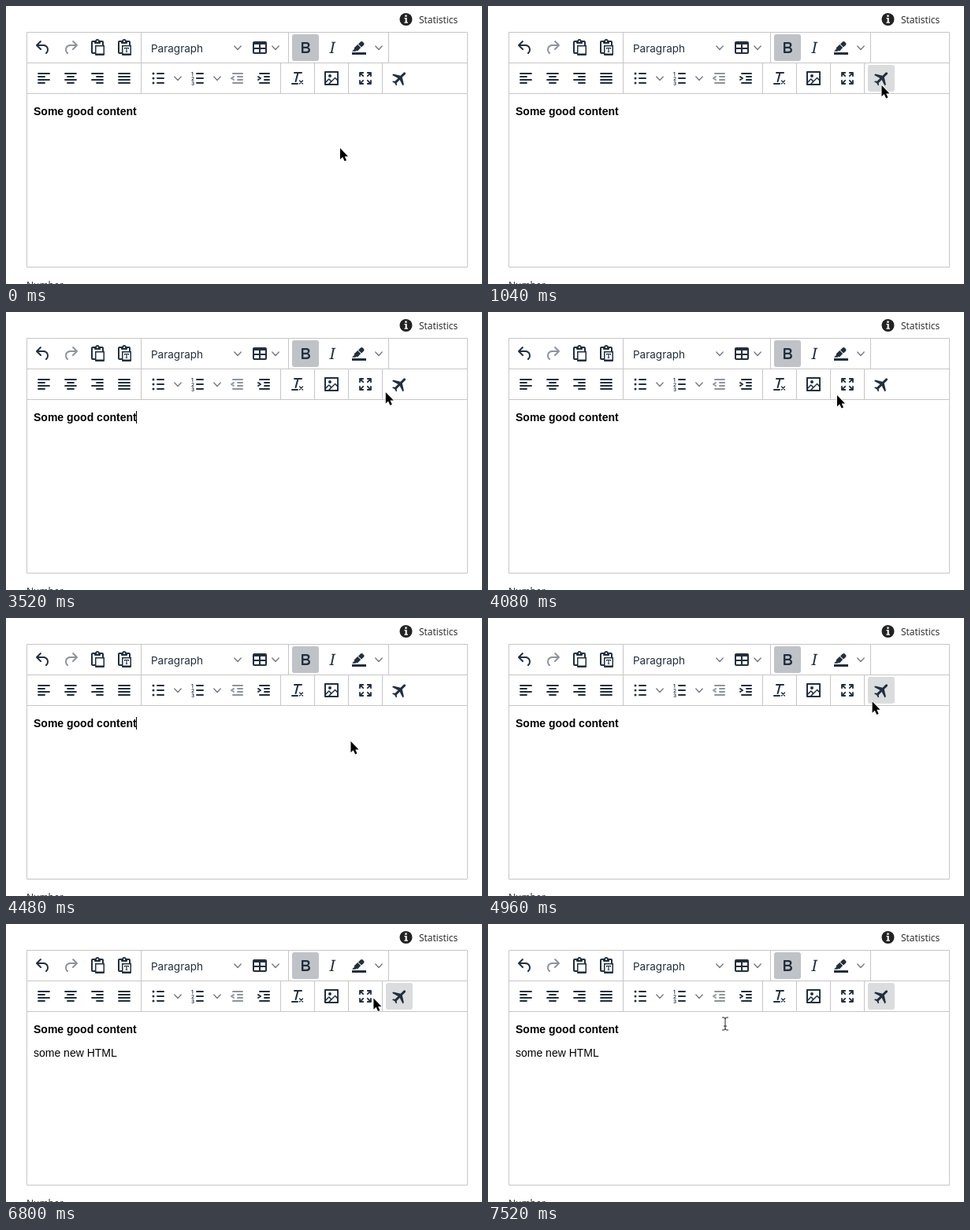
These frames come from a looping animation (604 px wide and 354 px high, 8.16 s). An HTML page:

```html
<!DOCTYPE html>
<html lang="en">
<head>
<meta charset="utf-8">
<title>Editor toolbar</title>
<style>
html, body { margin: 0; width: 100%; height: 100%; overflow: hidden; background: #fff; }
svg { display: block; }
.ui { font-family: Inter, sans-serif; }
.page { font: 12px "Open Sans", sans-serif; fill: #222; }
.body { font: 14px "Liberation Sans", Arial, sans-serif; fill: #000; }
.b { font-weight: bold; }
</style>
</head>
<body>
<svg width="604" height="354" viewBox="0 0 604 354">
  <circle cx="507.5" cy="17" r="8" fill="#222"/>
  <path d="M505.5 15h3.2v5.5h1.3v1.3h-4.6v-1.3h1.3v-4.2h-1.2zM506.3 11.4h2.4v2.3h-2.4z" fill="#fff"/>
  <text class="page" x="524" y="22">Statistics</text>
  <text class="page" x="26" y="360">Number</text>
  <path d="M26.5 33.5h559v299h-559zM26.5 72.5h559M26.5 111.5h559M171.5 33.5v78M358.5 33.5v39M485.5 33.5v39M348.5 72.5v39M391.5 72.5v39M434.5 72.5v39M477.5 72.5v39" fill="none" stroke="#c6c6c6"/>
  <rect x="363" y="36" width="34" height="34" rx="3" fill="#bfc3c8"/>
  <rect id="hover" x="482" y="75" width="34" height="34" rx="3"/>
  <g id="icons"></g>
  <text class="ui" x="184" y="58.5" font-size="13.5" fill="#222f3e">Paragraph</text>
  <g class="ui" font-size="6.5" font-weight="600" fill="#222f3e"><text x="235" y="89">1</text><text x="235" y="95">2</text><text x="235" y="101">3</text></g>
  <text class="body b" x="35" y="139">Some good content</text>
  <text class="body" id="added" x="35" y="169">some new HTML</text>
  <path id="caret" d="M165.5 126v16" stroke="#000"/>
  <g id="tip">
    <rect x="499" y="118" width="105" height="19" fill="#414042"/>
    <text class="ui" x="505" y="131.3" font-size="11" fill="#fff">Exclamation mark</text>
  </g>
  <path id="arrow" d="M0 0V14.2L3.2 11.2 5.6 16.6 8 15.6 5.7 10.4H10Z" fill="#000" stroke="#fff" stroke-width="1.2" paint-order="stroke"/>
  <path id="beam" d="M-4-8h2q2 0 2 2V6q0 2 2 2h2M4-8H2q-2 0-2 2M-4 8h2q2 0 2-2M-2 3h4" fill="none" stroke="#222"/>
</svg>
<script>
const $ = id => document.getElementById(id);
const INK = '#222f3e', DIM = '#8d949c';
const LOOP = 8160, STEP = 80;

// Icons use a 24px box centred on cx, cy
let markup = '';
function add(cx, cy, d, attrs) {
  markup += `<path transform="translate(${cx - 12} ${cy - 12})" d="${d}" ${attrs}/>`;
}
const fill = (cx, cy, d, color = INK) => add(cx, cy, d, `fill="${color}" fill-rule="evenodd"`);
const line = (cx, cy, d, color = INK, w = 2) =>
  add(cx, cy, d, `fill="none" stroke="${color}" stroke-width="${w}" stroke-linecap="round" stroke-linejoin="round"`);

const clip = 'M18 9V5h-2v1c0 .6-.4 1-1 1H9a1 1 0 0 1-1-1V5H6v13h3V9h9zM9 20H6a2 2 0 0 1-2-2V5c0-1.1.9-2 2-2h3.2A3 3 0 0 1 12 1a3 3 0 0 1 2.8 2H18a2 2 0 0 1 2 2v4h1v12.1c0 .5-.4.9-.9.9H9.9c-.5 0-.9-.4-.9-.9V20zm1.5-9.5v9h9v-9h-9zM12 3a1 1 0 0 0-1 1c0 .5.4 1 1 1s1-.5 1-1-.4-1-1-1z';
const undo = 'M6.4 8H12c3.7 0 6.2 2 6.8 5.1.6 2.7-.4 5.6-2.3 6.8a1 1 0 0 1-1-1.8c1.1-.6 1.8-2.7 1.4-4.6-.5-2.1-2.1-3.5-4.9-3.5H6.4l3.3 3.3a1 1 0 1 1-1.4 1.4l-5-5a1 1 0 0 1 0-1.4l5-5a1 1 0 0 1 1.4 1.4L6.4 8z';

fill(47, 53, undo);
markup += `<g transform="translate(165 0) scale(-1 1)">`;
fill(83, 53, undo, DIM);
markup += '</g>';
fill(116, 53, clip);
fill(150, 53, clip + 'M12 12h6v2h-.6q0-1-1-1h-.8v4.5h.8v.6h-2.8v-.6h.8V13h-.8q-1 0-1 1H12z');
fill(322, 53, 'M19 4a2 2 0 0 1 2 2v12a2 2 0 0 1-2 2H5a2 2 0 0 1-2-2V6c0-1.1.9-2 2-2h14zM5 14v4h6v-4H5zm14 0h-6v4h6v-4zm0-6h-6v4h6V8zM5 12h6V8H5v4z');
fill(380, 53, 'M7.8 19c-.3 0-.5 0-.6-.2l-.2-.5V5.7c0-.2 0-.4.2-.5l.6-.2h5c1.5 0 2.7.3 3.5 1 .7.6 1.1 1.4 1.1 2.5a3 3 0 0 1-.6 1.9c-.4.6-1 1-1.6 1.2.4.1.9.3 1.3.6s.8.7 1 1.2c.4.4.5 1 .5 1.6 0 1.3-.4 2.3-1.3 3-.8.7-2.1 1-3.8 1H7.8zm5-8.3c.6 0 1.2-.1 1.6-.5.4-.3.6-.7.6-1.3 0-1.1-.8-1.7-2.3-1.7H9.3v3.5h3.4zm.5 6c.7 0 1.3-.1 1.7-.4.4-.4.6-.9.6-1.5s-.2-1-.7-1.4c-.4-.3-1-.4-2-.4H9.4v3.8h4z');
fill(414, 53, 'M16.7 4.7l-.1.9h-.3c-.6 0-1 0-1.4.3-.3.3-.4.6-.5 1.1l-2.1 9.8v.6c0 .5.4.8 1.4.8h.2l-.2.8H8l.2-.8h.2c1.1 0 1.8-.5 2-1.5l2-9.8.1-.5c0-.6-.4-.8-1.4-.8h-.3l.2-.9h5.8z');
fill(448, 53, 'M3 18h18v3H3zM7.7 16.7H3l3.3-3.3-.7-.8L10.2 8l4 4.1-4 4.2c-.2.2-.6.2-.8 0l-.6-.7-1.1 1.1zm5-7.5L11 7.4l3-2.9a2 2 0 0 1 2.6 0L18 6c.7.7.7 2 0 2.7l-2.9 2.9-1.8-1.8-.5-.6');

// Alignment: long and short lines alternate
[[48, 5, 8], [82, 8, 8], [116, 11, 8], [150, 5, 14]].forEach(([cx, x, w]) =>
  line(cx, 92, `M5 6h14M${x} 10h${w}M5 14h14M${x} 18h${w}`, INK, 1.8));
line(193, 92, 'M11 6h8M11 12h8M11 18h8');
line(193, 92, 'M6 6h0M6 12h0M6 18h0', INK, 3);
line(243, 92, 'M11 6h8M11 12h8M11 18h8');
const lines = 'M7 6h12M13 10h6M13 14h6M7 18h12';
line(293, 92, lines + 'M8 10l-3 2 3 2', DIM);
line(327, 92, lines + 'M5 10l3 2-3 2');
fill(370, 92, 'M13.2 6a1 1 0 0 1 0 .2l-2.6 10a1 1 0 0 1-1 .8h-.2a.8.8 0 0 1-.8-1l2.6-10H8a1 1 0 1 1 0-2h9a1 1 0 0 1 0 2h-3.8zM5 18h7a1 1 0 0 1 0 2H5a1 1 0 0 1 0-2z');
line(370, 92, 'M14.5 15l4 4M18.5 15l-4 4', INK, 1.4);
fill(413, 92, 'M5 15.7l3.3-3.2c.3-.3.7-.3 1 0L12 15l4.1-4c.3-.4.8-.4 1 0l2 1.9V5H5v10.7zM5 18V19h3l2.8-2.9-2-2L5 17.9zm14-3l-2.5-2.4-6.4 6.5H19v-4zM4 3h16c.6 0 1 .4 1 1v16c0 .6-.4 1-1 1H4a1 1 0 0 1-1-1V4c0-.6.4-1 1-1zm6 8a2 2 0 1 0 0-4 2 2 0 0 0 0 4z');
line(456, 92, 'M14.8 5H19v4.2M19 5l-4.2 4.2M19 14.8V19h-4.2M19 19l-4.2-4.2M9.2 19H5v-4.2M5 19l4.2-4.2M5 9.2V5h4.2M5 5l4.2 4.2', INK, 1.8);
[[294, 53], [342, 53], [473, 53], [218, 92], [268, 92]].forEach(([x, y]) =>
  line(x, y, 'M7.8 10l4.2 4.4 4.2-4.4', '#747c86', 1.4));
markup += `<path transform="translate(499.6 91.9) rotate(45) translate(-11.5 -12)" fill="${INK}" d="M21 16v-2l-8-5V3.5C13 2.7 12.3 2 11.5 2S10 2.7 10 3.5V9l-8 5v2l8-2.5V19l-2 1.5V22l3.5-1 3.5 1v-1.5L13 19v-5.5l8 2.5z"/>`;
$('icons').innerHTML = markup;

// Pointer path: time, x, y
const path = [
  [0, 424, 181], [80, 436, 166], [160, 468, 132], [240, 491, 112], [479, 491, 112],
  [480, 510, 97], [600, 510, 97], [1040, 499.5, 101], [3280, 499.5, 101], [3680, 470, 103],
  [4080, 443, 106], [4160, 440, 142], [4240, 438, 156], [4480, 437.5, 157],
  [5040, 496, 98], [5520, 499.5, 88], [6720, 499.5, 88], [7200, 301, 127], [LOOP, 301, 127]
];
function pointer(t) {
  const i = path.findIndex(p => p[0] > t), [t0, x0, y0] = path[i - 1], [t1, x1, y1] = path[i];
  const k = (t - t0) / (t1 - t0);
  return [x0 + (x1 - x0) * k, y0 + (y1 - y0) * k];
}

const within = (t, a, b) => t >= a && t < b;
const show = (id, on) => $(id).setAttribute('visibility', on ? 'visible' : 'hidden');

function caretOn(t) {
  if (t >= 6000) return false;
  return (t < 2000 ? Math.min(3, Math.floor(t / 480)) : Math.floor((t - 80) / 480)) % 2 === 1;
}

function draw(now) {
  const t = Math.floor(now % LOOP / STEP) * STEP;
  const [x, y] = pointer(t), inText = t > 6800 && y > 112;
  for (const id of ['arrow', 'beam']) $(id).setAttribute('transform', `translate(${x} ${y})`);
  show('arrow', !inText);
  show('beam', inText);
  show('caret', caretOn(t));
  show('added', t >= 6000);
  show('tip', within(t, 2640, 3520));
  show('hover', within(t, 480, 3520) || t >= 4960);
  $('hover').setAttribute('fill', within(t, 5840, 6000) ? '#c8cbcf' : '#dadcde');
  requestAnimationFrame(draw);
}
draw(0);
</script>
</body>
</html>
```
